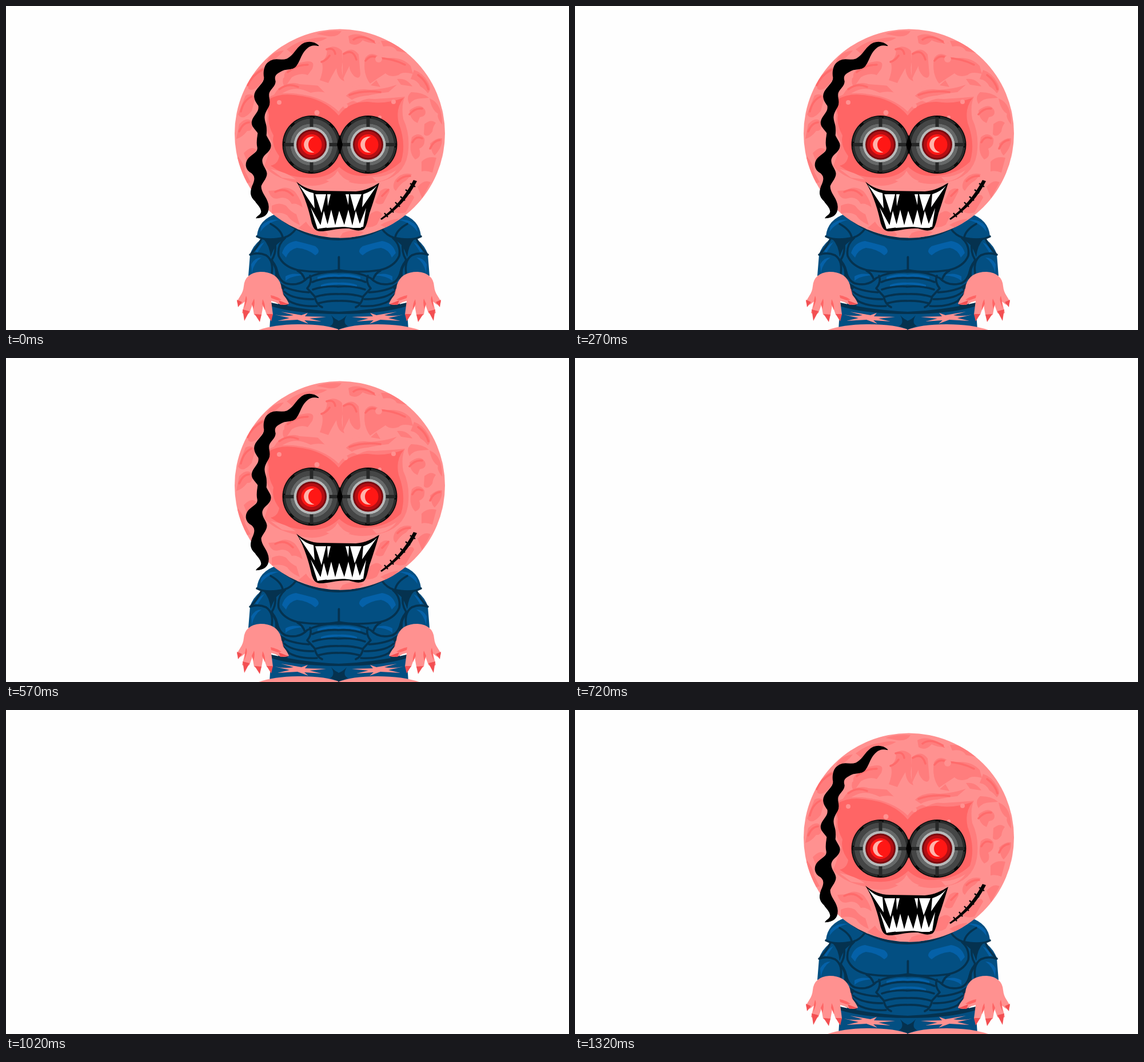
An HTML page that plays this animation: 985 px wide and 568 px high, repeating every 1350 ms.

```html
<!DOCTYPE html>
<html lang="en">
<head>
<meta charset="utf-8">
<title>Blinking monster</title>
<style>
html, body { margin: 0; width: 100%; height: 100%; overflow: hidden; background: #fefefe; }
svg { display: block; width: 985px; height: 568px; }
.suit { fill: #034f82; }
.shade { fill: #05324f; }
.shine { fill: #0561a8; }
.seam { fill: none; stroke: #05324f; stroke-width: 3.6; stroke-linecap: round; stroke-linejoin: round; }
.skin { fill: #ff9190; }
.fold { fill: #ff7d7d; }
.deep { fill: #ff6565; }
.crease { fill: none; stroke: #ff6b6b; stroke-width: 3.5; stroke-linecap: round; }
.claw { fill: #f34f52; }
</style>
</head>
<body>
<svg viewBox="0 0 985 568">
  <defs>
    <clipPath id="skull"><ellipse cx="584" cy="223.5" rx="184" ry="183"/></clipPath>

    <g id="half">
      <path class="suit" d="M584 364H474Q442 374 439 403L446 409Q431 421 427 436L424 473 465 480 474 500 478 542H584Z"/>
      <path class="shade" d="M470 366Q520 411 584 411V390Z"/>
      <path class="shine" d="M447 386Q458 372 477 375Q456 380 445 396ZM436 430Q443 418 452 414Q446 422 440 432ZM429 453Q435 441 447 441Q434 449 430 468Z"/>
      <path class="shine" d="M483 433Q488 415 507 412Q528 417 541 421Q553 430 541 437Q529 426 509 424Q495 427 490 441Z"/>
      <path class="shine" d="M545 475Q565 468 584 471V475Q561 474 545 480ZM489 474Q501 466 521 472Q498 473 489 482ZM551 489Q565 484 584 485V488Q563 489 551 493Z"/>
      <path class="seam" d="M439 404Q456 413 487 406Q499 402 507 391M484 405Q481 392 463 382M427 436Q442 431 455 437Q470 447 464 474M446 410Q440 423 429 434"/>
      <path class="seam" d="M488 407Q474 419 477 438Q485 457 511 463Q551 469 582.5 463V440M470 413Q474 431 465 445L474 464Q479 485 493 487Q514 491 527 477Q552 464 584 466"/>
      <path class="seam" d="M532 473Q536 484 527 495L540 509Q543 524 553 528M536 484Q557 475 584 477M537 497Q559 490 584 492M541 510Q560 504 584 505M547 521Q565 516 584 517"/>
      <path class="seam" d="M481 489Q498 500 530 502M487 501Q501 514 538 514M493 516Q512 528 544 526M510 464Q519 468 523 480"/>
      <path class="shade" d="M466 445Q479 458 477 482L469 483Q475 461 464 450ZM474 482L489 491 484 502 496 515 490 532 477 527ZM450 408L486 408 474 418Q468 425 463 440Q461 419 450 408Z"/>

      <path class="suit" d="M464 521Q518 536 584 539V568H461Z"/>
      <path class="shade" d="M464 520Q518 533 584 536V540Q507 540 463 526ZM569 542Q576 550 584 552V568L567 561Q577 556 569 542Z"/>
      <path class="skin" d="M470 541Q489 545 503 542L481 536 517 542 528 538 523 544 560 545 531 548 552 553 522 551 529 557 510 550 475 552 496 547Z"/>
      <path class="skin" d="M442 568Q470 558 515 558Q561 558 584 568Z"/>

      <path class="deep" d="M472 492L483 496 487 512 494 522 476 521Z"/>
      <path class="skin" d="M416 491Q418 468 445 466Q474 466 481 489L484 505Q492 514 495 522Q483 527 471 519L464 517 467 541Q462 547 456 541L450 524 447 542Q441 547 434 541L431 524 426 538Q420 543 413 538L418 518 412 523Q406 526 404 518L410 508Q415 501 416 491Z"/>
      <path class="claw" d="M404 515L413 519 406 528ZM414 532L426 535 417 552ZM435 540L447 541 444 554ZM456 540L467 540 464 553ZM477 516L495 523 480 524Z"/>
      <path class="deep" d="M420 508Q423 514 420 521L417 530 418 517ZM434 513Q436 521 433 531L430 522ZM449 514Q454 523 453 533L448 522ZM463 507Q474 509 482 515L475 516 464 512Z"/>
    </g>

    <g id="eye">
      <circle r="51" fill="#090a0a"/>
      <circle r="41.5" fill="none" stroke="#454646" stroke-width="9"/>
      <circle r="34" fill="none" stroke="#666868" stroke-width="6"/>
      <path d="M-48 0H-31M31 0H48M0-48V-31M0 31V48" stroke="#262727" stroke-width="6"/>
      <circle r="47.5" fill="none" stroke="#292a2a" stroke-width="4" stroke-dasharray="29 8.3" stroke-dashoffset="-5"/>
      <circle r="31" fill="#b8baba"/>
      <circle r="26.5" fill="#790c10"/>
      <circle r="23.5" fill="#b40e13"/>
      <circle r="18" fill="#ff1715"/>
      <path d="M5-13.5A14.5 14 0 1 0 5 13.5C-9 10-9-10 5-13.5Z" fill="#ffb3aa"/>
    </g>
  </defs>

  <g id="monster">
    <use href="#half"/>
    <use href="#half" transform="matrix(-1 0 0 1 1165 0)"/>

    <g clip-path="url(#skull)">
      <path class="skin" d="M399 39H769V408H399Z"/>

      <g class="fold">
        <path d="M491 76Q510 61 532 58Q550 53 562 56Q548 64 534 64Q517 74 507 91Q498 81 491 76ZM543 49Q563 42 587 44Q581 55 564 53Z"/>
        <path d="M599 53Q612 45 633 55L654 65Q637 67 624 60Q613 73 601 65ZM656 61Q684 60 706 83L684 79Q678 68 660 71Z"/>
        <path d="M549 130Q557 109 552 98Q564 88 561 75Q576 66 588 79L589 98Q585 115 592 132Q580 128 578 109Q568 126 564 135ZM589 83Q606 69 617 85L620 119Q619 130 609 123Q600 113 601 105Q593 120 589 130Z"/>
        <path d="M628 92Q636 79 650 87Q660 92 672 91Q694 90 708 105L712 119Q693 114 687 121Q672 126 664 118Q650 127 637 136Q624 119 628 92Z"/>
        <path d="M488 117Q505 98 529 97Q541 97 536 110L528 121Q515 116 500 125L489 141Q480 137 488 117ZM474 148Q494 130 513 137L539 139Q562 140 574 157Q554 147 533 152Q508 140 491 149L464 163Z"/>
        <path d="M594 157Q609 145 628 146Q652 149 684 138L669 151Q637 154 606 165ZM638 139L648 130 655 142ZM684 128Q701 126 711 141L691 138Z"/>
        <path d="M714 112Q729 117 738 133Q746 146 738 153Q731 144 725 141Q720 130 708 128ZM709 151Q729 151 740 161L726 162Q713 162 706 172Q699 159 709 151Z"/>
        <path d="M706 183Q725 168 733 182Q737 193 724 195L720 205Q707 200 706 183ZM741 162Q764 171 763 208Q753 195 756 189Q745 183 741 162ZM732 207Q744 197 752 205Q747 211 746 220Q738 232 731 225Z"/>
        <path d="M710 230Q723 219 732 232Q734 246 723 250Q728 265 716 269Q703 257 710 230ZM742 241Q754 230 763 232Q764 247 750 262Q745 259 742 241ZM727 273Q737 262 753 266L746 292Q736 288 727 290Z"/>
        <path d="M681 305Q693 290 710 295L700 306Q690 311 682 324Q674 318 681 305ZM655 324Q668 315 671 325L660 346Q651 350 646 344ZM720 317Q732 303 743 309L728 337ZM692 342Q711 324 714 336L699 362Q685 366 678 359Z"/>
        <path d="M637 365Q650 354 658 365L649 383Q637 391 626 386ZM589 398Q609 389 626 397L609 407H583ZM655 384Q671 374 687 373L668 390Z"/>
        <path d="M475 323Q490 313 505 325Q516 339 519 353Q509 345 500 347Q492 333 478 337Q464 341 459 324ZM465 350Q478 343 490 350Q498 361 508 365L514 384Q498 377 492 367Q481 360 465 364ZM525 378Q535 396 559 396Q570 405 551 403Q529 400 512 389Z"/>
        <path d="M457 96Q465 80 486 78Q478 89 458 101ZM432 121Q450 102 456 111Q453 128 443 139Q431 151 424 145Q422 133 432 121ZM419 157Q430 151 436 161L430 184Q414 203 406 190ZM408 207Q422 192 431 204Q433 220 422 219Q414 230 403 233ZM416 258Q429 244 438 252Q430 262 422 273ZM405 263Q416 275 418 289Q423 300 428 309L418 312Q404 284 405 263Z"/>
      </g>

      <path class="fold" d="M457 165Q463 151 501 153Q554 157 582 185Q599 159 645 163Q679 161 698 159Q691 174 695 198Q708 225 703 260Q696 300 650 309Q603 319 580 296Q550 326 505 309Q466 300 452 280L466 241 456 218Z"/>
      <path class="deep" d="M459 164Q477 153 503 156Q556 160 582 192Q600 167 633 168Q663 173 696 161Q681 179 687 205Q701 242 691 273Q668 295 635 297Q604 302 583 282Q562 303 530 301Q491 301 463 280Q476 277 478 263Q464 244 468 227Q457 207 460 191Q456 178 459 164Z"/>
      <path class="skin" d="M463 286Q491 291 507 304L483 301ZM560 305Q574 301 580 289Q588 303 602 307Q580 316 560 305ZM641 300Q662 301 683 288Q670 306 648 308Z"/>
      <path class="crease" d="M561 76Q574 72 576 84M552 98Q561 95 566 87M591 84Q607 74 613 94M629 96Q638 84 650 91Q677 92 698 103M493 116Q507 103 528 103M478 146Q494 134 511 142M601 156Q625 147 655 151M608 59Q622 48 646 64"/>
      <path class="crease" d="M706 190Q716 178 728 180M711 239Q717 227 728 232M721 121Q735 131 739 146M742 250Q748 236 759 235M685 307Q695 297 707 298M471 326Q488 317 502 332M423 139Q430 122 448 112M411 185Q415 166 429 159M408 220Q414 205 425 204M658 333L669 322"/>
      <path class="skin" d="M543 137Q562 130 579 150L581 181Q575 159 558 152ZM585 153Q601 139 620 139L616 144Q596 151 587 169ZM604 165Q625 153 657 159Q633 160 615 169Z"/>
      <g id="spots" class="skin"></g>
    </g>

    <path transform="translate(0 .7)" stroke="#000" stroke-width="1.2" d="M547 69C535 66 528 70 522 78C514 88 514 97 506 106C500 112 490 108 482 113C472 118 468 122 471 131C472 140 462 144 460 152C458 160 464 168 459 176C453 186 450 192 453 202C456 210 456 217 455 226C458 234 466 240 462 249C458 258 450 259 448 268C446 278 455 284 456 293C456 302 448 308 446 315C445 328 458 335 459 350C460 364 452 370 438 371C440 366 446 367 447 360C446 350 440 348 436 341C426 332 428 324 431 315C436 305 437 298 430 292C418 286 418 274 425 266C434 257 442 256 440 246C438 238 440 230 441 222C436 214 428 210 431 200C434 190 444 186 442 174C436 166 432 158 437 149C444 138 452 134 452 125C450 116 452 104 458 99C470 88 480 97 492 92C504 86 505 78 514 70C524 60 538 61 547 69Z"/>

    <use href="#eye" x="534.5" y="243"/>
    <use href="#eye" x="633.5" y="243"/>
    <path d="M579 243L584 225 589 243 584 261Z"/>

    <g transform="translate(0 1)">
      <path d="M508 307C520 317 535 323 550 323L612 324C628 323 642 316 653 309C647 328 642 345 636 362C632 378 630 388 625 391C615 395 608 391 600 389C580 388 565 394 549 394C540 393 538 388 535 380C530 355 520 325 508 307Z"/>
      <g fill="#fff">
        <path d="M512 312Q523 324 538 327L540 354ZM541 329H560L552 362ZM562 329H568L563 350ZM602 329H622L610 359ZM594 329H600L599 348ZM625 329Q640 324 649 314L623 352Z"/>
        <path d="M533 352L553 388 545 390ZM556 358L564 387 549 389ZM569 356L577 387 561 388ZM583 358L593 386 575 387ZM599 356L607 388 591 386ZM612 358L621 388 605 388ZM630 353L625 386 616 388Z"/>
      </g>
    </g>

    <path d="M655 373Q692 346 713 305L719 307Q698 349 657 375Z"/>
    <path d="M662 363L668 370M672 354L678 362M681 344L689 352M690 334L698 341M699 322L707 328M707 311L716 317" stroke="#080808" stroke-width="2.4"/>
  </g>
</svg>
<script>
const SVG = "http://www.w3.org/2000/svg";
const LOOP = 1350, BEAT = 150, LEAD = 30;
const monster = document.getElementById("monster");
const spots = document.getElementById("spots");

function addSpot(cx, cy, r) {
  const spot = document.createElementNS(SVG, "circle");
  for (const [key, value] of Object.entries({ cx, cy, r })) spot.setAttribute(key, value);
  spots.append(spot);
}

[[652, 93, 6], [594, 175, 4], [678, 168, 4], [544, 187, 4.5], [478, 169, 4],
 [425, 242, 6], [649, 62, 4], [483, 123, 4], [654, 195, 3]].forEach(s => addSpot(...s));

// Even beats show the figure; the last one runs on into the next loop.
function render(time) {
  const beat = Math.floor(((time + LEAD) % LOOP) / BEAT);
  monster.style.display = beat % 2 ? "none" : "";
}

const start = performance.now();
function tick() {
  render(performance.now() - start);
  requestAnimationFrame(tick);
}
tick();
</script>
</body>
</html>
```
